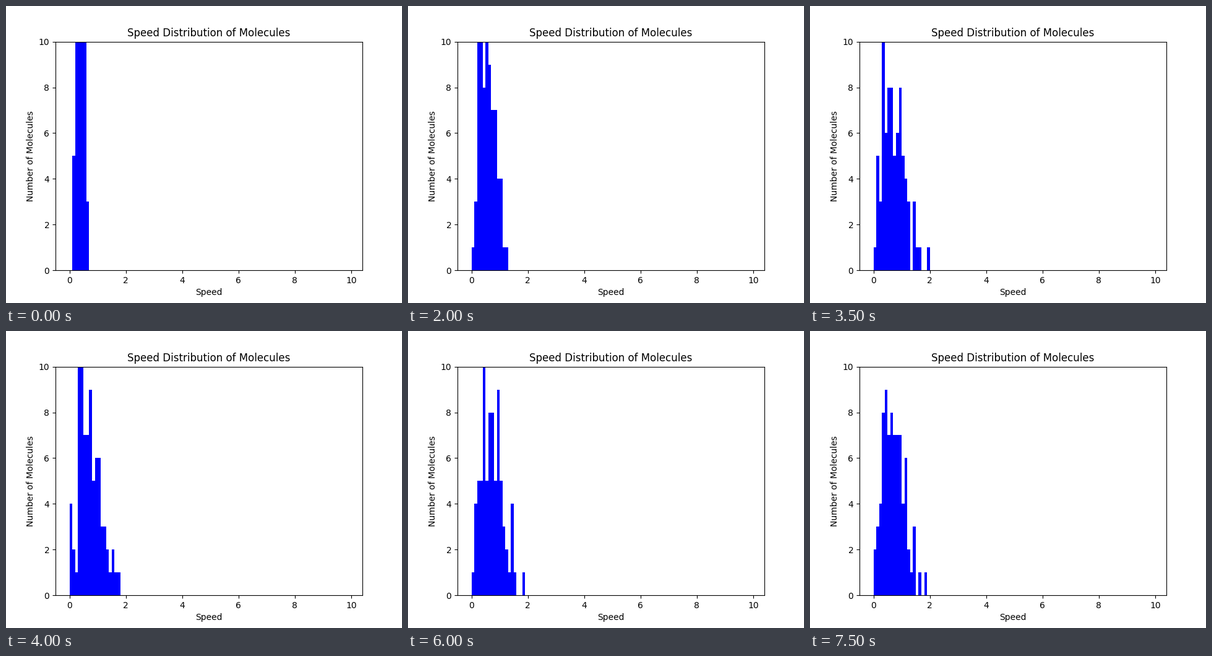
A matplotlib script that plays this animation: 640x480 px, repeating every 8000 ms.

```python
import matplotlib.pyplot as plt
import numpy as np
from matplotlib.animation import FuncAnimation

STEPS = 16
INTERVAL = 500
HEAT_STEPS = 6
MOLECULES = 80
SIGMA = 0.58
EDGES = np.arange(0, 10, 0.1)

# Each molecule keeps its rank; the distribution around it changes
rank = (np.arange(MOLECULES) + 0.5) / MOLECULES
cold = 0.17 + 0.448 * rank
warm = SIGMA * np.sqrt(-2 * np.log(1 - rank))  # Maxwell speeds in a plane


def speeds_at(step):
    """Heat up from even speeds to the Maxwell curve, then keep jostling."""
    heat = min(step / HEAT_STEPS, 1) ** 1.6
    rng = np.random.default_rng(step)
    jostle = 0.05 * heat * rng.standard_normal(MOLECULES)
    return np.abs(cold + heat * (warm - cold) + jostle)


fig, ax = plt.subplots(figsize=(6.4, 4.8), dpi=100)
bars = ax.hist([], bins=EDGES, color="blue")[2]
margin = 0.05 * EDGES[-1]
ax.set_xlim(-margin, EDGES[-1] + margin)
ax.set_ylim(0, 10)
ax.set_title("Speed Distribution of Molecules")
ax.set_xlabel("Speed")
ax.set_ylabel("Number of Molecules")


def update(step):
    counts, _ = np.histogram(speeds_at(step), EDGES)
    for bar, n in zip(bars, counts):
        bar.set_height(n)
    return bars.patches


anim = FuncAnimation(fig, update, frames=STEPS, interval=INTERVAL,
                     repeat=True, repeat_delay=0, blit=False)
plt.show()
```
